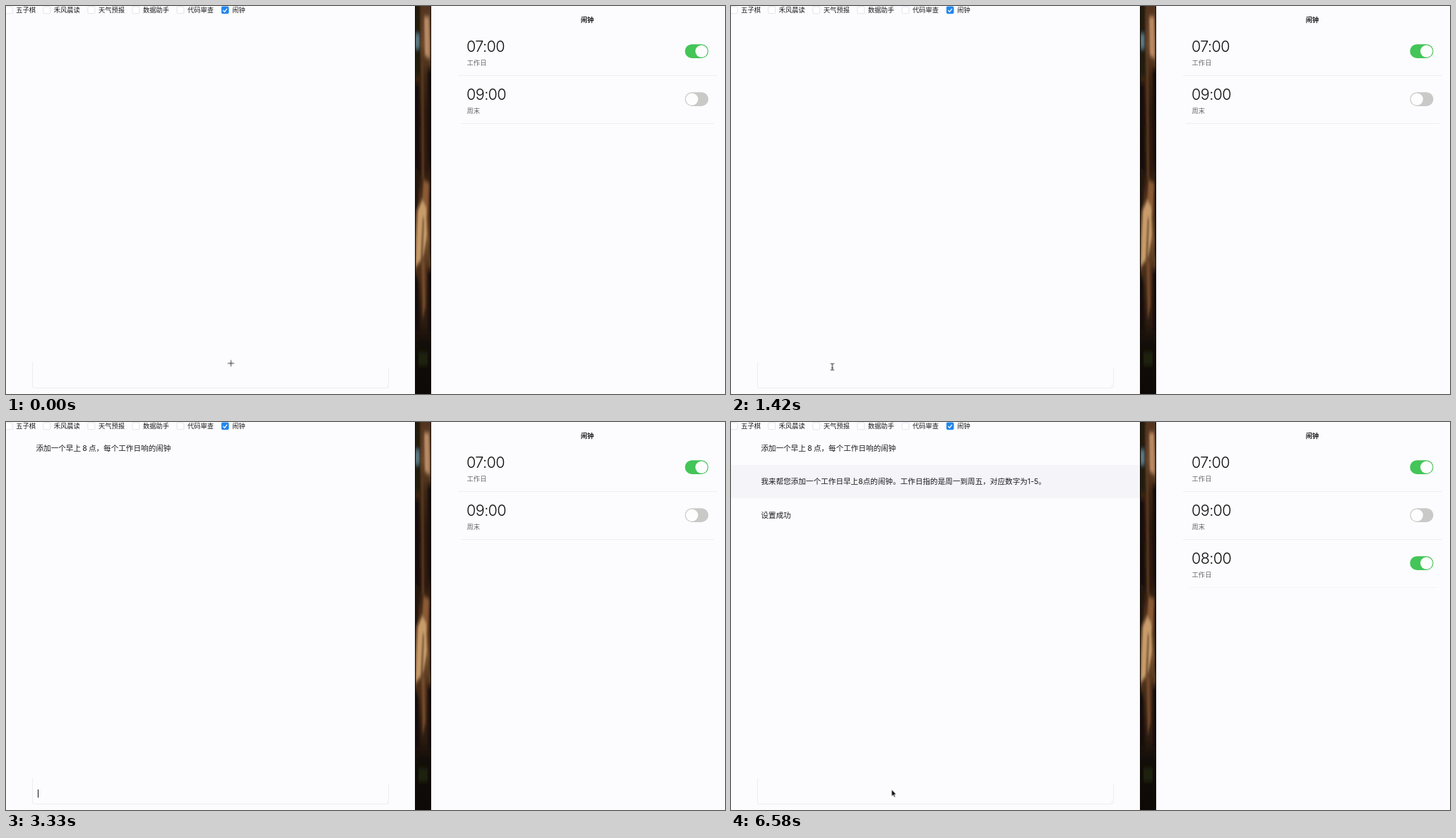
An HTML page that plays this animation: 1018x550 px, repeating every 8 s.

```html
<!DOCTYPE html>
<html lang="zh-CN">
<head>
<meta charset="utf-8">
<title>闹钟</title>
<style>
  html, body { margin: 0; width: 100%; height: 100%; overflow: hidden; background: #fcfcfe; }
  svg { display: block; width: 1018px; height: 550px; }
  text { font: 9.28px Inter, "Noto Sans CJK SC", "Noto Sans CJK", sans-serif; fill: #1c1c1e; word-spacing: -.08em; }
  .chat text { font-size: 10.6px; }
  .title { font-weight: 600; text-anchor: middle; }
  .time { font-size: 21.6px; font-weight: 300; letter-spacing: -.6px; fill: #111; }
  .days { fill: #666; }
  .rule { stroke: #ececf8; }
  .faint { stroke: #f4f4f9; }
  .box { fill: #fff; stroke: #dcdce4; stroke-width: .8; }
  .field { fill: none; stroke: #ededf2; }

  /* One loop is 8 s, so 1% is 80 ms. */
  .timed { animation: 8s step-end infinite; }
  #draft { animation-name: draft; }
  #sent { animation-name: sent; }
  .reply { animation-name: reply; }
  #caret { animation-name: caret; }
  #pointer { animation-name: travel; }
  #cross { animation-name: cross; }
  #arrow { animation-name: arrow; }
  #beam { animation-name: beam; }

  @keyframes draft { 0%, 41.625%, 100% { opacity: 0 } 20.875% { opacity: 1 } }
  @keyframes sent { 0% { opacity: 0 } 41.625%, 100% { opacity: 1 } }
  @keyframes reply { 0% { opacity: 0 } 82.25%, 100% { opacity: 1 } }
  @keyframes caret {
    0%, 17.75%, 26%, 38.5%, 47.875%, 60.375%, 72.875%, 82.25%, 100% { opacity: 0 }
    11.5% { opacity: 1; transform: translate(45px, 508px) }
    20.875%, 32.25% { opacity: 1; transform: translate(212px, 508px) }
    41.625%, 54.125% { opacity: 1; transform: translate(45px, 521px) }
    66.625%, 79.125% { opacity: 1; transform: translate(45px, 508px) }
  }
  @keyframes travel {
    0% { transform: translate(318.5px, 506.5px) }
    1% { transform: translate(309px, 511.5px) }
    2.125% { transform: translate(296.5px, 517.5px) }
    4.125% { transform: translate(276px, 519px) }
    5.25% { transform: translate(258px, 518px) }
    6.25% { transform: translate(243px, 517px) }
    7.25% { transform: translate(218px, 515px) }
    8.375% { transform: translate(189px, 513px) }
    9.375% { transform: translate(166px, 512px) }
    10.375% { transform: translate(150px, 511.5px) }
    11.5% { transform: translate(143.5px, 511.5px) }
    26% { transform: translate(188px, 518px) }
    27.125% { transform: translate(227.5px, 522px) }
    82.25%, 100% { transform: translate(227.5px, 521px) }
  }
  @keyframes cross { 0% { opacity: 1 } 4.125%, 100% { opacity: 0 } }
  @keyframes arrow { 0%, 7.25% { opacity: 0 } 4.125%, 82.25%, 100% { opacity: 1 } }
  @keyframes beam { 0%, 41.625%, 100% { opacity: 0 } 7.25% { opacity: 1 } }
</style>
</head>
<body>
<svg viewBox="0 0 1018 550">
  <defs>
    <linearGradient id="bark" x2="0" y2="1">
      <stop offset="0" stop-color="#51331f"/>
      <stop offset=".1" stop-color="#6b472c"/>
      <stop offset=".18" stop-color="#3d2614"/>
      <stop offset=".27" stop-color="#2b1a0f"/>
      <stop offset=".42" stop-color="#2b190f"/>
      <stop offset=".5" stop-color="#50311c"/>
      <stop offset=".6" stop-color="#7a5433"/>
      <stop offset=".68" stop-color="#4a2f1a"/>
      <stop offset=".82" stop-color="#2a1a10"/>
      <stop offset=".87" stop-color="#120e09"/>
      <stop offset="1" stop-color="#0d0906"/>
    </linearGradient>
    <filter id="soft" x="-1" y="-.2" width="3" height="1.4"><feGaussianBlur stdDeviation=".8 3"/></filter>
    <clipPath id="strip"><path d="M579 0h23v550h-23z"/></clipPath>
  </defs>

  <g clip-path="url(#strip)">
    <path fill="url(#bark)" d="M579 0h23v550h-23z"/>
    <g filter="url(#soft)">
      <path fill="#241c10" d="M578-10h8l1 110h-9z"/>
      <path fill="#5b7a83" d="M580 40h5v20h-5z"/>
      <path fill="#b88a63" d="M592 15h7l1 60-7-5z"/>
      <path fill="#5d3a22" d="M588 80h3l1 165h-3z"/>
      <path fill="#190f08" d="M578 110h7l1 130-8 30zM597 90h6v150l-5-20z"/>
      <path fill="#8a5a34" d="M591 246l8 5-2 45h-9z"/>
      <path fill="#c89c6b" d="M583 290l6-15 6 10 1 40-5 30-11 15z"/>
      <path fill="#6b472a" d="M590 300l2 0-2 60-3 0z"/>
      <path fill="#20130a" d="M578 225l8 10-3 50-5 10zM599 240h4v115h-3z"/>
      <path fill="#75492a" d="M588 360h5l1 65-4 20z"/>
      <path fill="#150e08" d="M578 375l6 15 2 75h-8zM597 375h6v90h-5z"/>
      <path fill="#1a2210" d="M584 490h13v20h-13z"/>
    </g>
    <path fill="#120c08" d="M579 0h1v550h-1zM601 0h1v550h-1z"/>
  </g>

  <g id="options"></g>
  <path d="M307.4 6l2.1 2.2 3.4-4.3" fill="none" stroke="#fff" stroke-width="1.3"/>

  <path class="field" d="M37.5 505V539q0 2.5 2.5 2.5H539q2.500 0 2.500-2.500V513"/>
  <path class="field" d="M537.5 540l3-3"/>
  <text id="draft" class="timed" x="44.8" y="517.4">添加一个早上 8 点，每个工作日响的闹钟</text>

  <g class="chat">
    <text id="sent" class="timed" x="42.5" y="41">添加一个早上 8 点，每个工作日响的闹钟</text>
    <g class="timed reply">
      <path fill="#f4f4f9" d="M0 61h579v47H0z"/>
      <text x="42.5" y="88.3">我来帮您添加一个工作日早上8点的闹钟。工作日指的是周一到周五，对应数字为1-5。</text>
      <text x="42.5" y="135.5">设置成功</text>
    </g>
  </g>

  <text class="title" x="823" y="22.5">闹钟</text>
  <g id="alarms"></g>

  <rect id="caret" class="timed" width="1" height="11.5" fill="#111"/>
  <g id="pointer" class="timed">
    <path id="cross" class="timed" d="M-4.5 0h9M0-4.500v9" fill="none" stroke="#333"/>
    <path id="arrow" class="timed" d="M0 0V9.5L2.200 7.500 3.700 11 5.200 10.300 3.700 7H6.300z" fill="#000" stroke="#fff" stroke-width=".6"/>
    <path id="beam" class="timed" d="M-2.5-4.5H-1Q0-4.500 0-3.500 0-4.500 1-4.500H2.500M0-3.500V3.500M-2.500 4.500H-1Q0 4.500 0 3.500 0 4.500 1 4.500H2.500M-1.200 1.500H1.200" fill="none" stroke="#222"/>
  </g>
</svg>
<script>
  const fill = (id, items, render) => {
    document.getElementById(id).innerHTML = items.map(render).join("");
  };

  const options = ["五子棋", "禾风晨读", "天气预报", "数据助手", "代码审查", "闹钟"];
  const labelX = [14.3, 67.8, 130.9, 194, 257, 320.3];
  fill("options", options, (label, i) => {
    const checked = label === "闹钟" ? 'style="fill:#2086ee;stroke:#2086ee"' : "";
    return `<rect class="box" x="${labelX[i] - 15}" y=".9" width="9.8" height="9.8" rx="1.4" ${checked}/>
      <text x="${labelX[i]}" y="9.4">${label}</text>`;
  });

  const alarms = [
    { time: "07:00", days: "工作日", on: true, inset: 0 },
    { time: "09:00", days: "周末", on: false, inset: 4 },
    { time: "08:00", days: "工作日", on: true, inset: 8, added: true },
  ];
  fill("alarms", alarms, ({ time, days, on, inset, added }, i) => {
    const y = i * 68;
    const widerRule = added ? `<path class="rule" d="M640 ${y + 30.5}H1007"/>` : "";
    return `<g class="${added ? "timed reply" : ""}">
      ${widerRule}
      <text class="time" x="652" y="${y + 65.4}">${time}</text>
      <text class="days" x="652.6" y="${y + 84.4}">${days}</text>
      <rect x="961.3" y="${y + 54.2}" width="33.2" height="19.8" rx="9.9" fill="${on ? "#43c558" : "#c9c9c7"}"/>
      <circle cx="${on ? 984.7 : 971.2}" cy="${y + 64.1}" r="8.7" fill="#fdfdfd"/>
      <path class="rule ${added ? "faint" : ""}" d="M${640 + inset} ${y + 98.5}H${1007 - inset}"/>
    </g>`;
  });
</script>
</body>
</html>
```
